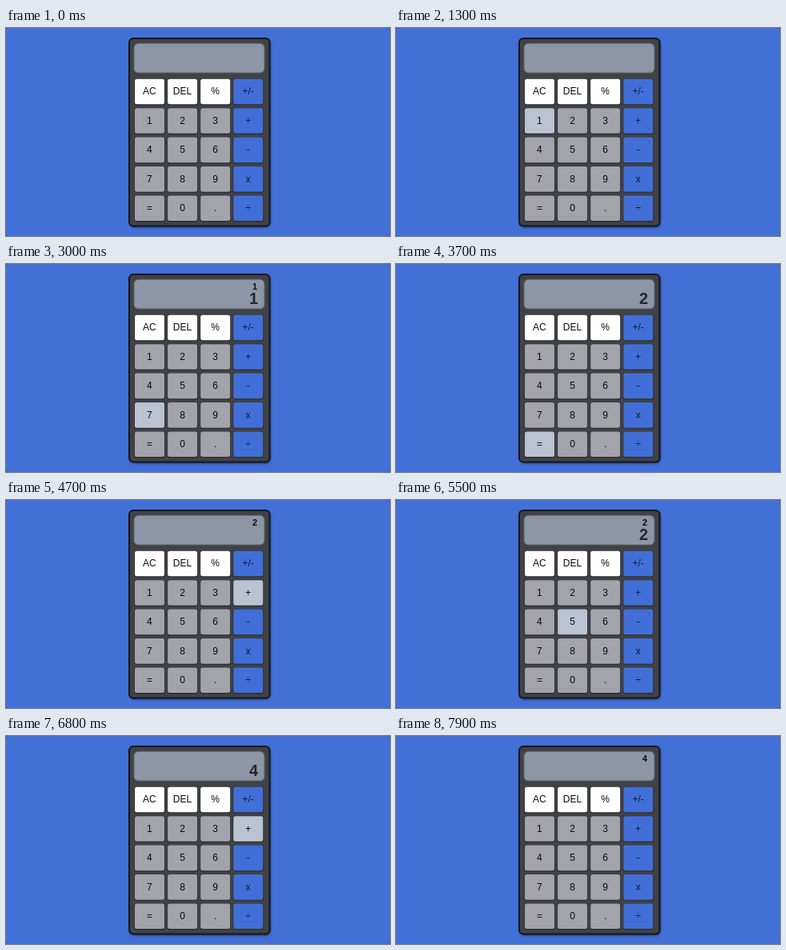
Recreate the animation shown at these times as an HTML page. Size 480 px wide and 260 px high, loop 8000 ms.

```html
<!DOCTYPE html>
<html lang="en">
<head>
<meta charset="utf-8">
<title>Calculator</title>
<style>
  html, body { margin: 0; width: 100%; height: 100%; overflow: hidden; background: #2c4680; }
  svg { display: block; width: 480px; height: 260px; }
  text { font-family: "Liberation Sans", Arial, sans-serif; fill: #0b0c10; }
  .key text { font-size: 12px; text-anchor: middle; }
  .key rect { fill: #a2a3ab; }
  .key.top rect { fill: #fff; }
  .key.op rect { fill: #416fd7; }
  .key.op text { fill: #0c1838; }
  .key.hover rect { fill: #b9c3d2; }
  .key.hover text { fill: #0b0c10; }
  .key .shade { fill: #222327 !important; opacity: .65; }
  .out { font-weight: bold; text-anchor: end; }
</style>
</head>
<body>
<svg viewBox="0 0 480 260">
  <defs>
    <filter id="soft" x="-10%" y="-10%" width="120%" height="120%">
      <feGaussianBlur stdDeviation="1"/>
    </filter>
  </defs>
  <rect width="480" height="260" rx="2" fill="#4270d7"/>
  <rect x="154.5" y="13.5" width="176.5" height="236" rx="6" fill="#17203a" opacity=".7" filter="url(#soft)"/>
  <rect x="154" y="13" width="175.5" height="234.5" rx="5" fill="#414246" stroke="#15171f" stroke-width="2"/>
  <rect x="159.5" y="18.8" width="164" height="37.8" rx="6" fill="#5c626d"/>
  <rect x="160.5" y="19.8" width="162" height="35.8" rx="5" fill="#8d96a6"/>
  <text class="out" id="prev" x="314" y="32.3" font-size="11"></text>
  <text class="out" id="cur" x="315" y="50" font-size="20" style="fill:#25272d"></text>
  <g id="pad"></g>
</svg>
<script>
const LOOP = 8000;
const $ = id => document.getElementById(id);
const labels = "AC DEL % +/- 1 2 3 + 4 5 6 - 7 8 9 x = 0 . ÷".split(" ");

// Pointer path: time in ms, key under the pointer ("" = none)
const path = [
  [0, ""], [600, "÷"], [700, "x"], [800, "9"], [900, "8"], [1000, "5"], [1100, "4"], [1200, "1"],
  [1800, "2"], [1900, "3"], [2000, "+"], [2400, "3"], [2500, "2"], [2600, "1"],
  [2900, "4"], [3000, "7"], [3200, "="],
  [3900, "0"], [4000, "8"], [4100, "5"], [4300, "6"], [4400, "+"],
  [4800, "3"], [5000, "2"], [5500, "5"], [5600, "8"], [5700, "7"], [5800, "="],
  [6300, "7"], [6400, "8"], [6500, "5"], [6600, "6"], [6700, "+"], [7700, ""]
];

// Display: time, upper line, lower line
const screen = [
  [0, "", ""], [1600, "", "1"], [2200, "1", ""], [2800, "1", "1"], [3500, "", "2"],
  [4600, "2", ""], [5300, "2", "2"], [6000, "", "4"], [7500, "4", ""]
];

$("pad").innerHTML = labels.map((label, i) => {
  const col = i % 4, row = i >> 2;
  const x = 161 + col * 41.1, y = 63.7 + row * 36.45;
  const kind = col === 3 ? "op" : row === 0 ? "top" : "";
  return `<g class="key ${kind}" transform="translate(${x} ${y})">
    <rect class="shade" x="-.7" y="-.3" width="38.6" height="33.1" rx="3"/>
    <rect width="37" height="31.6" rx="2.5"/>
    <text x="18.4" y="19.8">${label}</text></g>`;
}).join("");
const keys = [...$("pad").children];

const at = (list, t) => list.findLast(step => step[0] <= t);

function draw(now) {
  const t = now % LOOP;
  const hovered = at(path, t)[1];
  keys.forEach((key, i) => key.classList.toggle("hover", labels[i] === hovered));
  [, $("prev").textContent, $("cur").textContent] = at(screen, t);
}

function tick() {
  draw(performance.now());
  requestAnimationFrame(tick);
}
tick();
</script>
</body>
</html>
```
